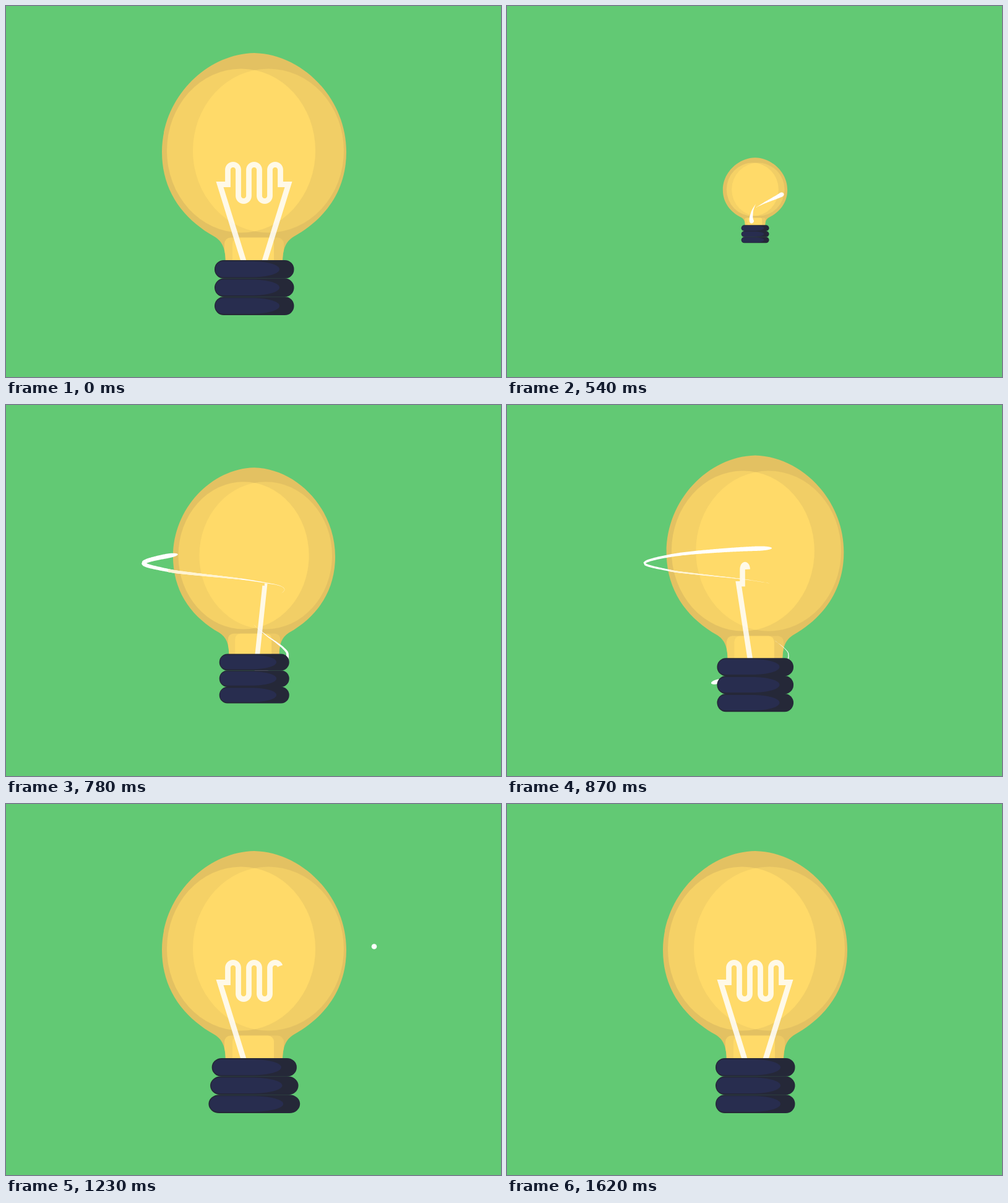
An HTML page for the animation above (1.98 s loop, 800x600 px).

```html
<!DOCTYPE html>
<html lang="en">
<head>
<meta charset="utf-8">
<title>Light bulb</title>
<style>
  html, body { margin: 0; width: 100%; height: 100%; overflow: hidden; background: #62c974; }
  svg { display: block; width: 100%; height: 100%; }
</style>
</head>
<body>
<svg viewBox="0 0 800 600">
  <defs>
    <path id="glass" d="M401 76C480 78 550 150 550 236C550 300 515 345 465 373C452 381 447 393 447 415H355C355 393 350 381 337 373C287 345 252 300 252 236C252 150 322 78 401 76Z"/>
    <ellipse id="left" cx="380" cy="234" rx="120" ry="132.5"/>
    <ellipse id="right" cx="424" cy="234" rx="122" ry="132.5"/>
    <rect id="neckL" x="353" y="374.5" width="80" height="60" rx="10"/>
    <rect id="neckR" x="366" y="374.5" width="83" height="60" rx="10"/>
    <clipPath id="inGlass"><use href="#glass"/></clipPath>
    <clipPath id="inLeft"><use href="#left"/></clipPath>
    <clipPath id="inNeck"><use href="#neckL"/></clipPath>
    <g id="ring">
      <rect x="337" y="411" width="128.5" height="29.8" rx="14.9" fill="#252838"/>
      <path d="M352 413H395C425 413 442 419 442 425.7C442 432.5 425 438.5 395 438.5H352C343 438.5 338.5 432.5 338.5 425.7C338.5 419 343 413 352 413Z" fill="#282d4f"/>
    </g>
  </defs>
  <rect width="800" height="600" fill="#62c974"/>
  <g class="bulb">
    <use href="#glass" fill="#e3c162"/>
    <g clip-path="url(#inGlass)">
      <use href="#right" fill="#f1ce66"/>
      <use href="#left" fill="#f5d166"/>
      <use href="#right" fill="#ffda69" clip-path="url(#inLeft)"/>
      <use href="#neckR" fill="#eeca65"/>
      <use href="#neckL" fill="#f5d166"/>
      <use href="#neckR" fill="#ffda69" clip-path="url(#inNeck)"/>
    </g>
  </g>
  <path id="wire" fill="none" stroke="#fff" stroke-opacity=".84"/>
  <g id="trails"></g>
  <g class="bulb">
    <use class="ring" href="#ring"/>
    <use class="ring" href="#ring"/>
    <use class="ring" href="#ring"/>
  </g>
</svg>
<script>
const LOOP = 1980, STEP = 30, CX = 401, CY = 327;
const $ = s => document.querySelector(s), $$ = s => [...document.querySelectorAll(s)];
const bulbs = $$('.bulb'), rings = $$('.ring'), wire = $('#wire');

// Monotone cubic curve through [time, value] keys
function curve(...keys) {
  const slope = i => (keys[i + 1][1] - keys[i][1]) / (keys[i + 1][0] - keys[i][0]);
  const tan = keys.map((k, i) => {
    if (!i || i === keys.length - 1) return 0;
    const a = slope(i - 1), b = slope(i);
    return a * b > 0 ? 2 * a * b / (a + b) : 0;
  });
  return t => {
    if (t <= keys[0][0]) return keys[0][1];
    const i = keys.findIndex(k => k[0] > t) - 1;
    if (i < 0) return keys[keys.length - 1][1];
    const h = keys[i + 1][0] - keys[i][0], u = (t - keys[i][0]) / h, v = 1 - u;
    return keys[i][1] * v * v * (1 + 2 * u) + keys[i + 1][1] * u * u * (3 - 2 * u)
      + h * u * v * (tan[i] * v - tan[i + 1] * u);
  };
}

const scaleX = curve([360, 0], [540, .35], [690, .745], [870, .962], [990, 1]);
const scaleY = curve([360, 0], [540, .3255], [690, .762], [870, .978], [960, 1]);
const spin = curve([510, -285], [690, -170], [870, -60], [1050, 0]);
const drawn = curve([570, 0], [690, 75], [870, 195], [1230, 467], [1410, 529], [1620, 645]);

// Filament centre line
const wirePts = [[384.8, 415], [345.5, 288.5], [358.5, 288.5]];
for (let i = 0; i < 5; i++) {
  const x = 367 + i * 17, up = i % 2 === 0;
  for (let a = 0; a <= 16; a++) {
    const r = Math.PI * a / 16;
    wirePts.push([x - 8.5 * Math.cos(r), up ? 265 - 8.5 * Math.sin(r) : 307 + 8.5 * Math.sin(r)]);
  }
}
wirePts.push([443.5, 288.5], [456.5, 288.5], [417.2, 415]);

function cut(pts, len) {
  const out = [pts[0]];
  for (let i = 1; i < pts.length && len > 0; i++) {
    const [x, y] = pts[i - 1], dx = pts[i][0] - x, dy = pts[i][1] - y;
    const d = Math.hypot(dx, dy), k = Math.min(1, len / d);
    out.push([x + dx * k, y + dy * k]);
    len -= d;
  }
  return out;
}

const line = pts => pts.length ? 'M' + pts.map(p => p[0].toFixed(2) + ' ' + p[1].toFixed(2)).join('L') : '';

function addShape(tag, fill) {
  const el = document.createElementNS('http://www.w3.org/2000/svg', tag);
  el.setAttribute('fill', fill);
  return $('#trails').appendChild(el);
}

// A tapered streak along a smooth path; head and tail keys are [time, point index]
function streak(pts, head, tail, dim) {
  const N = 24, path = [];
  let len = 0;
  for (let i = 0; i < pts.length - 1; i++) {
    const p = [pts[Math.max(0, i - 1)], pts[i], pts[i + 1], pts[Math.min(pts.length - 1, i + 2)]];
    for (let j = i ? 1 : 0; j <= N; j++) {
      const u = j / N, v = 1 - u;
      const [x, y] = [0, 1].map(c => p[1][c] * v * v * (1 + 2 * u) + p[2][c] * u * u * (3 - 2 * u)
        + u * v * (v * (p[2][c] - p[0][c]) - u * (p[3][c] - p[1][c])) / 2);
      const last = path[path.length - 1];
      if (last) len += Math.hypot(x - last.x, y - last.y);
      path.push({ x, y, len });
    }
  }
  path.forEach((p, i) => {
    const a = path[Math.max(0, i - 1)], b = path[Math.min(path.length - 1, i + 1)];
    const d = Math.hypot(b.x - a.x, b.y - a.y) || 1;
    p.nx = (a.y - b.y) / d;
    p.ny = (b.x - a.x) / d;
  });
  const lenAt = i => path[i * N].len;
  const toLen = keys => curve(...keys.map(([t, i]) => [t, lenAt(i)]));
  const headLen = toLen(head), tailLen = toLen(tail);
  const body = addShape('path', '#fff'), shade = addShape('path', '#fff4d2'), dot = addShape('circle', '#fff');

  function sample(s) {
    let i = path.findIndex(p => p.len >= s);
    if (i < 1) i = i < 0 ? path.length - 1 : 1;
    const a = path[i - 1], b = path[i], k = (s - a.len) / (b.len - a.len || 1);
    const mix = n => a[n] + (b[n] - a[n]) * k;
    return [mix('x'), mix('y'), mix('nx'), mix('ny')];
  }

  return t => {
    const h = headLen(t), s = tailLen(t), size = h - s, cap = size * .06 + 2;
    const half = q => {
      const v = (q - s) / size, e = Math.max(0, 1 - (h - q) / cap);
      return 4 * Math.pow(v, 1.15) * Math.sqrt(Math.max(0, 1 - e * e));
    };
    const ribbon = (from, to) => {
      if (to - from < .5) return '';
      const n = Math.ceil((to - from) / 2) + 8, a = [], b = [];
      for (let i = 0; i <= n; i++) {
        const k = i / n, q = from + (to - from) * (1 - (1 - k) * (1 - k));
        const [x, y, nx, ny] = sample(q), w = half(q);
        a.push([x + nx * w, y + ny * w]);
        b.unshift([x - nx * w, y - ny * w]);
      }
      return line(a.concat(b)) + 'Z';
    };
    const small = size > .01 && size < 9 && s > 0;
    body.setAttribute('d', size > 0 && !small ? ribbon(s, h) : '');
    shade.setAttribute('d', dim && size > 0 && !small
      ? ribbon(Math.max(s, lenAt(dim[0])), Math.min(h, lenAt(dim[1]))) : '');
    const [x, y] = sample(h);
    dot.setAttribute('cx', x);
    dot.setAttribute('cy', y);
    dot.setAttribute('r', small ? 4.3 : 0);
  };
}

const streaks = [
  streak([[402, 326], [417, 318], [447, 303], [449, 296], [440, 291.5], [425, 288.5], [380, 281.5],
    [302, 273], [262, 267.5], [222, 256], [262, 244], [330, 236.5], [428, 231.5], [595, 230.5]],
    [[450, 0], [540, 2], [690, 7], [870, 12], [990, 13]],
    [[540, 0], [690, 1], [870, 5], [1240, 13]], [6, 8]),
  streak([[402, 320], [396, 334], [397, 351], [420, 372], [432, 380.5], [448, 393], [455, 404],
    [446, 418], [390, 436], [330, 450], [312, 458], [330, 468], [380, 474]],
    [[450, 0], [540, 2], [690, 6], [870, 9], [1020, 12]],
    [[540, 0], [690, 1], [870, 4], [1050, 12]])
];

// Rings swell one after another, from the bottom up
function swell(t, row) {
  const d = t - 1230 - (2 - row) * 90;
  const k = d < 0 ? 1 + d / 330 : 1 - d / 180;
  return 1 + .15 * Math.max(0, k);
}

function draw(ms) {
  let t = Math.floor((ms % LOOP) / STEP) * STEP;
  if (t < 360) t = LOOP;
  const sx = scaleX(t), sy = scaleY(t);
  for (const b of bulbs) {
    b.setAttribute('transform', `translate(${CX} ${CY}) scale(${sx} ${sy}) translate(${-CX} ${-CY})`);
    b.setAttribute('visibility', sx > 0 ? 'visible' : 'hidden');
  }
  const shift = 14 * (1 - sx);
  $('#left').setAttribute('cx', 380 + shift);
  $('#right').setAttribute('cx', 424 - shift);
  rings.forEach((r, i) =>
    r.setAttribute('transform', `translate(${CX} ${i * 29.6}) scale(${swell(t, i)} 1) translate(${-CX} 0)`));

  const turn = Math.cos(spin(t) * Math.PI / 180), len = drawn(t);
  const pts = len > 0 ? cut(wirePts, len) : [];
  wire.setAttribute('d', line(pts.map(([x, y]) => [CX + (x - CX) * turn * sx, CY + (y - CY) * sy])));
  wire.setAttribute('stroke-width', 8.8 * sx);
  streaks.forEach(s => s(t));
}

const start = performance.now();
function tick() {
  draw(performance.now() - start);
  requestAnimationFrame(tick);
}
tick();
</script>
</body>
</html>
```
